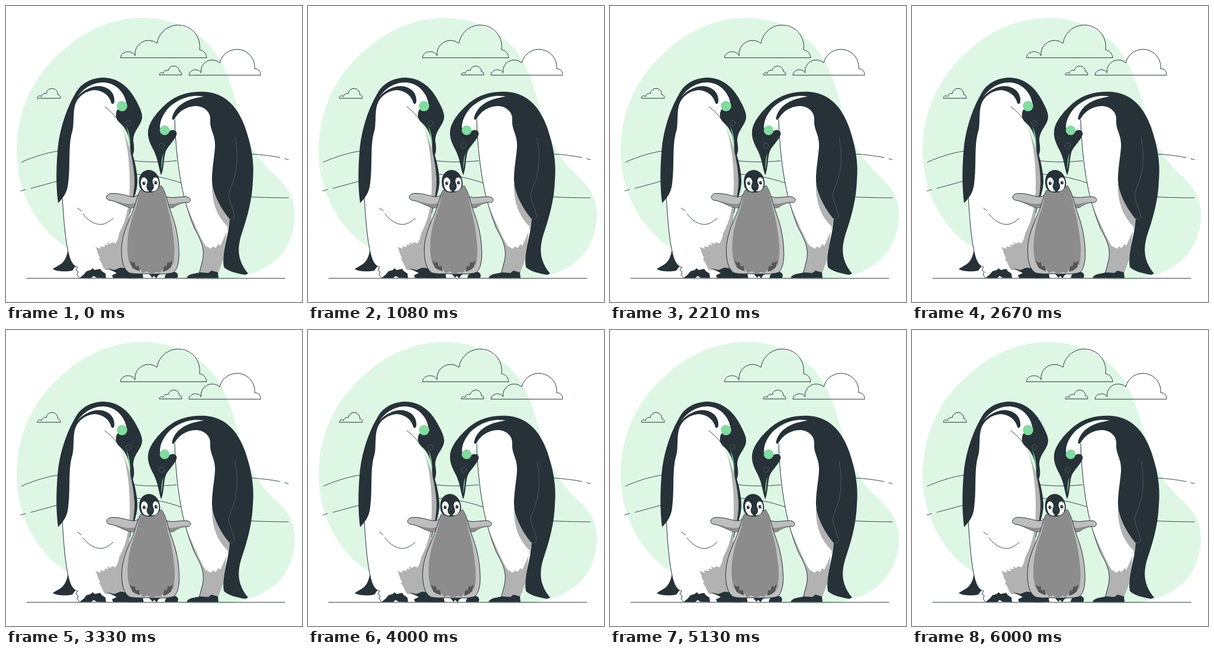
Animation of 500 by 500 pixels, one loop 6040 ms. Source, as an HTML page with a canvas:

```html
<!DOCTYPE html>
<html lang="en">
<head>
<meta charset="utf-8">
<title>Penguin family</title>
<style>
html, body { margin: 0; width: 100%; height: 100%; overflow: hidden; background: #fff; }
canvas { display: block; width: 500px; height: 500px; }
</style>
</head>
<body>
<canvas id="stage" width="500" height="500"></canvas>
<script>
const ctx = document.getElementById('stage').getContext('2d');
const INK = '#263238', MINT = '#def7e5', GREEN = '#82dba0';
const SHADE = '#b2b2b2', LIGHT = '#bebebe', DOWN = '#8c8c8c', TUFT = '#555', FAINT = '#53636b', WHITE = '#fff';
const LOOP = 6040, CYCLE = 6000;
// sideways offset at every tenth of the cycle
const SHAKE = [0, -1, 2, -4, 4, -4, 4, -4, 2, -1, 0];

function fill(d, color) {
  ctx.fillStyle = color;
  ctx.fill(new Path2D(d));
}

function line(d, color = INK, width = 1) {
  ctx.strokeStyle = color;
  ctx.lineWidth = width;
  ctx.stroke(new Path2D(d));
}

function shape(d, color, width = 1) {
  fill(d, color);
  line(d, INK, width);
}

function oval(x, y, rx, ry, color) {
  ctx.fillStyle = color;
  ctx.beginPath();
  ctx.ellipse(x, y, rx, ry, 0, 0, Math.PI * 2);
  ctx.fill();
}

function ring(x, y, r) {
  ctx.strokeStyle = FAINT;
  ctx.lineWidth = 0.8;
  ctx.beginPath();
  ctx.arc(x, y, r, 0, Math.PI * 2);
  ctx.stroke();
}

function drawScene() {
  fill('M230 20C275 20 318 38 346 69C364 90 374 114 384 145C392 174 396 193 405 215C417 243 434 267 449 281C470 300 488 318 488 352C488 405 455 463 345 463C270 463 195 447 125 419C60 393 18 320 18 245C18 176 46 118 95 76C135 38 185 20 230 20Z', MINT);

  line('M193.5 87C194 75 214 74 218 84A23 23 0 0 1 255 63A36.4 36.4 0 0 1 327 74C334 75 338 80 339 87Z');
  line('M309 116.5C310 106 326 105 329.5 113A19 19 0 0 1 361 96A30 30 0 0 1 420 106C427 106 430 110 430 116.5Z');
  line('M259 116C259 112 264 112 265.5 114A6 6 0 0 1 274 109A9.6 9.6 0 0 1 293 111C296 111 297 113 297 116Z');
  line('M53 155.5C53 151 58 151 60 153A6 6 0 0 1 68 148A9.8 9.8 0 0 1 87.5 150C91 150 92 153 92 155.5Z');

  line('M26 264L31 261.5C50 254 68 248 88 245M25 312.5L33 310M42 308L90 295', INK, 0.9);
  line('M216 261.5C240 264 262 264 288 261.5M216 284C245 285 270 290 296 299', INK, 0.9);
  line('M414 250C432 251 448 253 463 256M471 258L477 259.5M412 322.5C436 323.5 455 324 477 324', INK, 0.9);
}

function drawLeftParent() {
  fill('M101 385C108 404 105 424 95 434C89 439 83 441 79 444.5C87 449 103 449 112 447L120 436Z', INK);
  fill('M212 245C218 262 222 282 222 298C221 312 217 324 212 334L207 300Z', INK);

  const side = 'M95 322C97 352 99 385 104 410C107 428 112 439 121 441L118 446L122 449L120 454L124 459';
  fill(side + 'L131 453L146 444L168 450L200 459L207 455C204 425 207 385 209 350C215 325 219 305 217 285C216 270 213 258 211 246L192 197L188 176L206 168C202 146 186 127 165 127C145 127 130 138 114 165L100 230Z', WHITE);
  line(side);
  fill('M194 199C204 225 209 260 209 300C209 340 202 365 191 384C190 393 187 397 185 401L179 399L176 402L171 399L172 404L166 403L167 407L159 406L160 410L151 407C156 416 154 419 159 425L157 428C163 434 162 440 168 446L206 448C203 418 207 380 209 350C215 325 219 305 217 285C216 270 213 258 211 246Z', SHADE);
  line('M211 246C213 258 216 270 217 285C219 305 215 325 209 350');
  line('M167 170C175 176 182 183 188 191M121 341.5L127 346M130 351C141 365 151 369 161 369C169 368 175 364 181 358.5', INK, 0.9);

  fill('M124 459.5L131 454L136 448L143 446L146 443L150 446L159 444L162 448L168 452L169 459.5L153 459L148 456L144 459.5Z', INK);
  fill('M171 443L183 446L193 442L203 443L207 450L218 451L222 459.5L181 459.5L179 455L187 451Z', INK);

  fill('M88 333C84 302 85 272 87 246C90 207 103 172 117 148C128 128 147 121 166 121C194 122 211 142 221 162C228 175 232 185 229 193C225 205 215 212 215 228C217 240 217 248 213 254C210 250 210 238 208 226C205 212 200 204 192 197C185 191 184 183 188 175L204 168C202 148 187 130 165 129C145 129 130 140 120 154C132 140 150 133 163 136C177 139 184 150 183 161C183 165 180 167 178 164C175 152 165 143 150 142C135 143 122 152 117 166C112 181 116 203 111 215C105 238 109 270 105 300C103 317 96 324 88 333Z', INK);
  oval(196, 169, 8.8, 8.8, GREEN);
  fill('M203 203C208 211 210 224 210 239C207 226 207 214 203 203Z', GREEN);
  ring(207, 198, 4.5);
}

function drawRightParent() {
  fill('M284 192C286 230 290 268 296 300C301 328 310 354 318 375C330 397 336 410 332 430L326 453L358 453L367 425L380 362L356 220L344 172L310 165Z', WHITE);
  fill('M260 206C260 187 276 158 334 150L345 180L310 175L285 195L276 213Z', WHITE);
  // shaded leg and the shadow beside the flipper
  fill('M304 336C309 353 313 365 318 375C330 397 336 410 332 430L326 452L358 452L367 428L374 372C356 355 347 330 348 300L380 355L374 378L367 394L362 405L359 402L354 409L350 406L346 410L337 405C327 389 318 366 304 336Z', SHADE);
  line('M285 192C286 230 290 268 296 300C301 328 310 354 318 375C330 397 336 410 332 430L326 453');
  fill('M305 459.5C307 455 311 453 318 452L328 450L342 451L347 447L358 450L359 459.5Z', INK);

  fill('M262 286C257 270 257 260 250 245C243 232 239 222 240 212C241 196 256 178 272 164C292 148 312 144 337 145C372 148 392 172 404 205C414 235 420 262 417 295C416 325 409 352 399 382C389 411 392 431 409 452L404 454C390 452 375 448 368 441C365 425 371 400 375 382L378 360C365 345 349 318 348 295C348 270 354 245 353 232C352 215 344 208 345 193C346 180 337 171 323 169C306 168 292 178 285 190C283 194 279 192 281 187C286 170 302 157 334 153C310 148 285 160 272 175C263 187 260 195 260 206L276 211C284 207 290 211 288 218C284 228 274 236 270 245C266 255 267 276 262 286Z', INK);
  line('M387 222C391 245 392 267 386 290C382 302 378 310 376 319C378 333 384 343 386 354C386 359 382 361 377 359', FAINT, 0.8);
  oval(268, 210, 8.3, 8.3, GREEN);
  fill('M266 249C262 257 263 267 262 276C265 267 264 258 266 249Z', GREEN);
  ring(263, 236, 4.5);
}

function drawChick() {
  fill('M205 459.5C205 453 210 450 219 450L231 453L232 459.5Z', INK);
  fill('M268 459.5C268 453 274 449 284 449C290 450 292 455 289 459.5Z', INK);
  fill('M241 452L247 459L250 456L254 460L257 455L262 452Z', INK);

  shape('M224 318C220 322 217 323 211 322C198 319 186 315 175 317C168 320 168 326 174 328C185 329 197 337 207 340C212 342 216 341 219 338Z', LIGHT);
  shape('M268 321C278 326 291 322 304 322C312 323 314 329 308 332C298 331 289 336 283 340C279 342 275 341 273 338Z', LIGHT);
  fill('M180 328C194 332 207 337 218 333L219 338C208 343 196 334 180 328Z', DOWN);
  fill('M272 334C284 336 296 329 308 331C296 331 286 340 277 341Z', DOWN);

  shape('M226 312C221 322 219 335 214 347C204 370 195 390 195 412C195 432 199 446 209 451C222 454 234 451 246 453C258 452 272 454 283 450C291 444 293 427 292 412C291 385 285 365 278 346C273 334 272 319 263 304Z', LIGHT);
  fill('M226 312C222 325 222 335 217 347C210 365 205 385 205 407C205 422 207 432 211 439L213 434L216 443L219 438L221 447L227 445L231 451L238 448L246 453L254 449L260 451L264 446L270 448L272 440L277 443L278 435L282 438C285 425 285 410 284 400C282 380 279 362 275 347C271 335 271 319 263 304Z', DOWN);
  fill('M209 430L214 434L217 432L219 440L224 439L226 448L218 445L213 442Z', TUFT);
  fill('M281 430L276 434L273 432L271 440L267 439L265 449L273 446L279 441Z', TUFT);

  fill('M225 302C223 286 231 277 241 277C252 277 259 287 260 299C260 308 254 314 244 315C233 316 226 311 225 302Z', INK);
  fill('M228 300C227 292 231 288 235 290C239 293 240 297 238 301C236 306 238 310 242 313C233 315 229 309 228 300Z', WHITE);
  fill('M258 299C258 291 254 288 250 290C247 293 247 297 249 301C251 306 249 310 245 313C254 314 258 308 258 299Z', WHITE);
  oval(233, 299.5, 2.5, 3, INK);
  oval(253, 298.5, 2.5, 3, INK);
  oval(233.8, 298.5, 0.7, 0.7, WHITE);
  oval(253.8, 297.5, 0.7, 0.7, WHITE);
  line('M238 306C242 303 246 303 249 306M243 298L243 302', FAINT, 0.7);
}

function shakeAt(ms) {
  const pos = Math.min(ms / CYCLE, 1) * 10;
  const i = Math.min(Math.floor(pos), 9);
  return SHAKE[i] + (SHAKE[i + 1] - SHAKE[i]) * (pos - i);
}

let start;
function draw(now) {
  if (start === undefined) start = now;
  ctx.clearRect(0, 0, 500, 500);
  ctx.lineJoin = ctx.lineCap = 'round';
  drawScene();
  line('M35 460H471', INK, 1.1);
  drawLeftParent();
  drawRightParent();
  ctx.save();
  ctx.translate(shakeAt((now - start) % LOOP), 0);
  drawChick();
  ctx.restore();
  requestAnimationFrame(draw);
}
requestAnimationFrame(draw);
</script>
</body>
</html>
```
